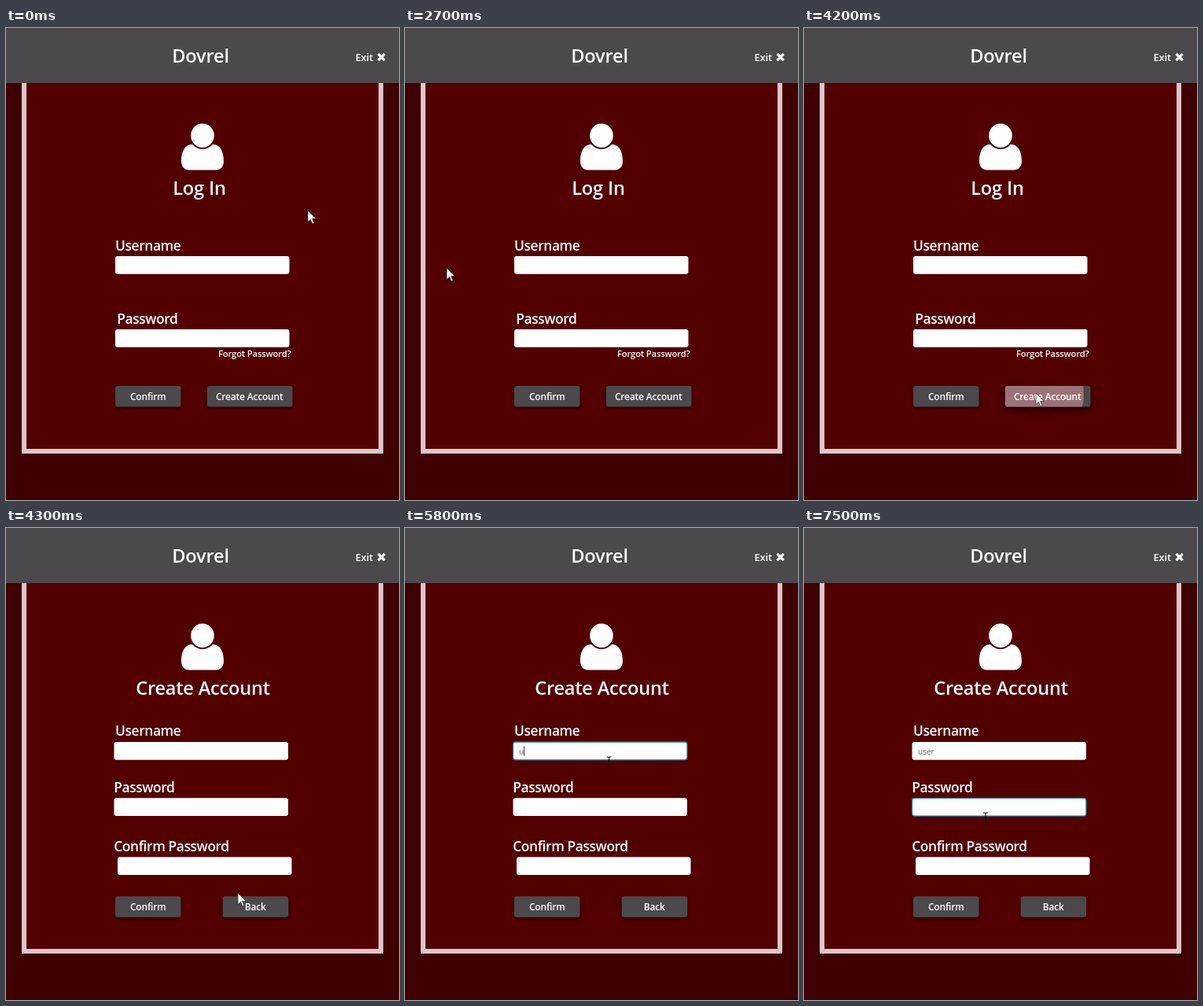
Write an HTML page that moves like this. It is 500 px wide and 600 px high and loops after 8 s.

```html
<!DOCTYPE html>
<html lang="en">
<head>
<meta charset="utf-8">
<title>Log In</title>
<style>
  html, body { margin: 0; width: 100%; height: 100%; overflow: hidden; background: #3e0000; }
  svg { display: block; width: 500px; height: 600px; }
  text { font: 600 12px "Open Sans", "Noto Sans", sans-serif; fill: #fff; letter-spacing: -.2px; }
  .mid { text-anchor: middle; }
  .head { font-size: 23.6px; }
  .label { font-size: 17.4px; letter-spacing: -.4px; }
  .exit { font-size: 13px; }
  .small { font-size: 11.3px; }
  .typed { font-size: 10px; font-weight: 400; fill: #666; letter-spacing: 0; }
  .button { fill: #4b494b; filter: drop-shadow(0 2px 2px rgba(0, 0, 0, .45)); }
  .raised { filter: drop-shadow(0 4px 5px rgba(0, 0, 0, .6)); }
  .field { fill: #fff; }
  .focus { stroke: #14809c; stroke-width: 1.3; }
</style>
</head>
<body>
<svg viewBox="0 0 500 600">
  <defs><clipPath id="clip"><rect x="256" y="455" width="108.5" height="26.5" rx="3"/></clipPath></defs>
  <rect width="500" height="600" fill="#3e0000"/>
  <rect x="23" y="50" width="454" height="488" fill="#520000" stroke="#e0c5c9" stroke-width="6"/>
  <rect width="500" height="70" fill="#4b494b"/>
  <text class="head mid" x="247.5" y="44">Dovrel</text>
  <text class="exit" x="444.5" y="41.5">Exit</text>
  <path d="M475 33.8l6 6m0-6l-6 6" stroke="#fff" stroke-width="3.2" stroke-linecap="square" transform="translate(-.4 .2)"/>
  <g fill="#fff">
    <ellipse cx="250" cy="136.7" rx="14.8" ry="15.2"/>
    <path d="M237 148C227 148 223 158 223 169C223 176 227 180.5 233 180.5H267C273 180.5 277 176 277 169C277 158 273 148 263 148C259 152 255 154 250 154C245 154 241 152 237 148Z"/>
  </g>
  <g id="login"></g>
  <g id="signup"></g>
  <path id="arrow" d="M0 0V14.6L3.4 11.4L5.8 16.8L8 15.8L5.7 10.5H10.3Z" fill="#fff" stroke="#222" stroke-width=".7"/>
  <path id="beam" d="M-3-6H-1L0-5L1-6H3M0-5V5M-3 6H-1L0 5L1 6H3" fill="none" stroke="#111" stroke-width="1.1"/>
</svg>
<script>
const LOOP = 8000, STEP = 100;
const $ = id => document.getElementById(id);
const NS = "http://www.w3.org/2000/svg";

function add(parent, tag, attrs, text = "") {
  const el = document.createElementNS(NS, tag);
  for (const key in attrs) el.setAttribute(key, attrs[key]);
  el.textContent = text;
  return parent.appendChild(el);
}
const write = (g, cls, x, y, text) => add(g, "text", { class: cls, x, y }, text);
const field = (g, x, y) => add(g, "rect", { class: "field", x, y, width: 221.5, height: 22.8, rx: 3 });
const button = (g, x, y, width) => add(g, "rect", { class: "button", x, y, width, height: 26.5, rx: 3 });
const caretAt = (g, y) => add(g, "rect", { x: 145, y, width: 1, height: 12, fill: "#333" });
const show = (el, on) => el.style.display = on ? "" : "none";

const login = $("login"), signup = $("signup");

write(login, "head mid", 246, 212, "Log In");
write(login, "label", 139, 282.5, "Username");
field(login, 139, 290);
write(login, "label", 141.2, 375.5, "Password");
field(login, 139, 383);
write(login, "small", 270, 418, "Forgot Password?");
button(login, 139, 455, 83.5);
const createButton = button(login, 256, 455, 108.5);
const rippleBox = add(login, "g", { "clip-path": "url(#clip)" });
const ripple = add(rippleBox, "circle", { cx: 296, cy: 466, r: 0, fill: "#eb9da5", opacity: .5 });
write(login, "mid", 180.7, 472.7, "Confirm");
write(login, "mid", 309.7, 472.7, "Create Account");

write(signup, "head mid", 250.5, 212, "Create Account");
write(signup, "label", 139, 264.4, "Username");
const nameField = field(signup, 137.5, 272);
write(signup, "label", 137.2, 335.6, "Password");
const passField = field(signup, 137.5, 343.3);
write(signup, "label", 137.2, 410.6, "Confirm Password");
field(signup, 142, 418.3);
button(signup, 139, 468.3, 83.5);
button(signup, 275.7, 468.3, 83.5);
write(signup, "mid", 180.7, 486, "Confirm");
write(signup, "mid", 317.3, 486, "Back");
const typed = write(signup, "typed", 145, 287.5, "");
const nameCaret = caretAt(signup, 277.5);
const passCaret = caretAt(signup, 348.5);

// Pointer way points: time, x, y
const path = [
  [0, 384, 232], [1400, 384, 232], [1600, 60, 290], [1700, -40, 300],
  [2600, -40, 300], [2700, 53, 305], [3300, 219, 334], [3500, 227, 350],
  [4000, 295, 464], [4400, 295, 464], [5200, 259.5, 297], [6200, 259.5, 297],
  [6400, 246, 354], [6500, 246, 354], [6700, 233, 362], [6800, 233, 362],
  [7000, 231, 369], [7100, 231, 368], [LOOP, 231, 368]
];

function pointer(t) {
  const i = path.findIndex(p => p[0] > t);
  const [t0, x0, y0] = path[i - 1], [t1, x1, y1] = path[i];
  const k = (t - t0) / (t1 - t0), e = k * k * (3 - 2 * k);
  return [x0 + (x1 - x0) * e, y0 + (y1 - y0) * e];
}

function overField(x, y, tops) {
  return x > 138 && x < 361 && tops.some(top => y > top - 2 && y < top + 27);
}

function draw(now) {
  const t = Math.floor(now % LOOP / STEP) * STEP;
  const creating = t >= 4300;
  show(login, !creating);
  show(signup, creating);

  const [x, y] = pointer(t);
  const beamOn = overField(x, y, creating ? [272, 343, 418] : [290, 383]);
  for (const [id, on] of [["arrow", !beamOn], ["beam", beamOn]]) {
    show($(id), on);
    $(id).setAttribute("transform", `translate(${x} ${y})`);
  }

  ripple.setAttribute("r", Math.max(0, (t - 4000) * .3));
  createButton.classList.toggle("raised", t >= 4000);

  const onName = t >= 5300 && t < 7000, onPass = t >= 7000;
  nameField.classList.toggle("focus", onName);
  passField.classList.toggle("focus", onPass);

  const count = [5800, 5900, 6100, 6200].filter(s => t >= s).length;
  typed.textContent = "user".slice(0, count);
  nameCaret.setAttribute("x", 145 + (count ? typed.getComputedTextLength() : 0));
  show(nameCaret, onName && t < 6700);
  show(passCaret, onPass && t < 7500);
}

function tick() {
  draw(performance.now());
  requestAnimationFrame(tick);
}
tick();
</script>
</body>
</html>
```
